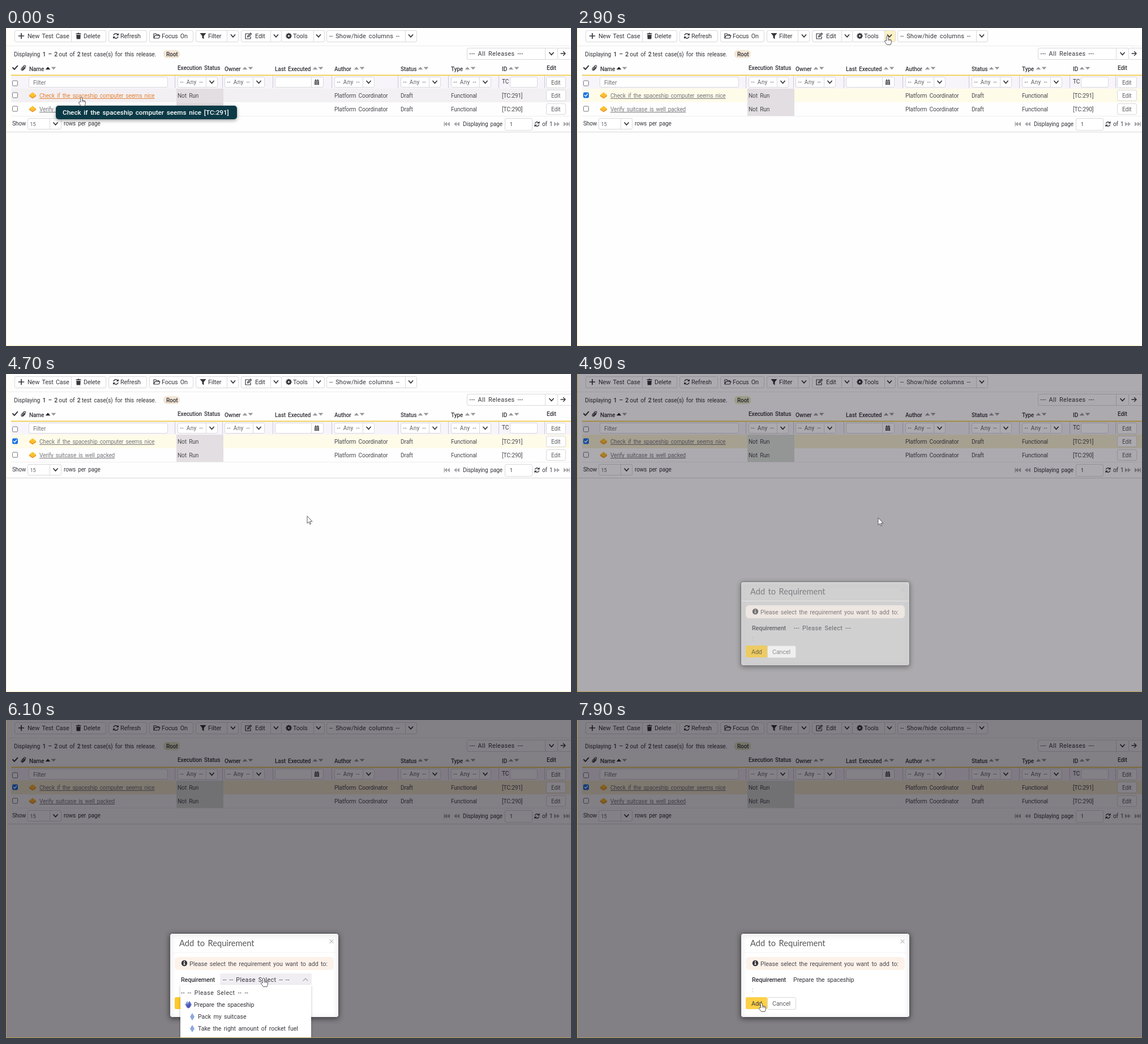
Recreate the animation shown at these times as an HTML page with a canvas. Size 998x561 px, loop 8 s.

```html
<!DOCTYPE html>
<html lang="en">
<head>
<meta charset="utf-8">
<title>Add test case to requirement</title>
<style>
html, body { margin: 0; width: 100%; height: 100%; overflow: hidden; background: #fff; }
canvas { display: block; width: 998px; height: 561px; }
</style>
</head>
<body>
<canvas id="stage" width="998" height="561"></canvas>
<script>
const ctx = document.getElementById('stage').getContext('2d');
const LOOP = 8000, INK = '#36363c', GREY = '#606066', LINE = '#d9d9dc';
const clamp = v => Math.max(0, Math.min(1, v));

// Pointer stops: time, x, y
const stops = [
  [0, 133, 122], [700, 14, 118], [1100, 14, 118], [1200, 13, 118], [1600, 13, 118],
  [2300, 400, 50], [2800, 548, 14], [3200, 548, 14], [4100, 532, 251], [4700, 532, 251],
  [5000, 532, 255], [5900, 455, 455], [6200, 455, 455], [6900, 414, 496],
  [7200, 414, 496], [7800, 326, 499], [8000, 326, 499]
];

function pointerAt(t) {
  const i = stops.findIndex(s => s[0] > t);
  const [t0, x0, y0] = stops[i - 1], [t1, x1, y1] = stops[i];
  const u = (t - t0) / (t1 - t0), e = u * u * (3 - 2 * u);
  return { x: x0 + (x1 - x0) * e, y: y0 + (y1 - y0) * e };
}

function text(str, x, y, { size = 10, color = INK, weight = 400, font = 'Roboto', spacing = -0.15 } = {}) {
  ctx.font = `${weight} ${size}px ${font}, sans-serif`;
  ctx.letterSpacing = spacing + 'px';
  ctx.wordSpacing = '1.8px';
  ctx.fillStyle = color;
  ctx.fillText(str, x, y);
  return x + ctx.measureText(str).width;
}

function rect(x, y, w, h, color) {
  ctx.fillStyle = color;
  ctx.fillRect(x, y, w, h);
}

function box(x0, y0, x1, y1, { fill = '#fff', line = LINE, radius = 2.5 } = {}) {
  const inset = line ? .5 : 0;
  ctx.beginPath();
  ctx.roundRect(x0 + inset, y0 + inset, x1 - x0 - 2 * inset, y1 - y0 - 2 * inset, radius);
  ctx.fillStyle = fill;
  ctx.fill();
  if (line) { ctx.strokeStyle = line; ctx.lineWidth = 1; ctx.stroke(); }
}

function shape(path, x, y, { fill, line, width = 1.5 } = {}) {
  ctx.save();
  ctx.translate(x, y);
  const p = new Path2D(path);
  if (fill) { ctx.fillStyle = fill; ctx.fill(p, 'evenodd'); }
  if (line) {
    ctx.strokeStyle = line;
    ctx.lineWidth = width;
    ctx.lineCap = ctx.lineJoin = 'round';
    ctx.stroke(p);
  }
  ctx.restore();
}

function shadowed(blur, color, draw) {
  ctx.save();
  ctx.shadowBlur = blur;
  ctx.shadowColor = color;
  ctx.shadowOffsetY = 2;
  draw();
  ctx.restore();
}

const chevron = (x, y) => shape('M-3.5-2L0 2L3.5-2', x, y, { line: INK, width: 1.8 });
const divider = (x, y0, y1) => rect(x, y0, 1, y1 - y0, LINE);

function select(x, y0, y1, w, split, label, opts) {
  box(x, y0, x + w, y1);
  divider(x + split, y0, y1);
  text(label, x + 4.5, (y0 + y1) / 2 + 3.5, opts);
  chevron(x + (split + w) / 2, (y0 + y1) / 2);
}

function checkbox(y, checked) {
  box(11, y - 5, 21, y + 5, { fill: checked ? '#1a73e8' : '#fff', line: checked ? '#1a73e8' : '#77777c', radius: 1.5 });
  if (checked) shape('M-2.6 0L-.7 2L2.8-2.2', 16, y, { line: '#fff', width: 1.4 });
}

function refreshIcon(x, y, r) {
  ctx.strokeStyle = INK;
  ctx.lineWidth = 1.4;
  for (const a of [Math.PI * 1.08, Math.PI * .08]) {
    ctx.beginPath();
    ctx.arc(x, y, r, a, a + 2.3);
    ctx.stroke();
  }
  shape(`M${r + .8}-5V-1H${r - 3.6}ZM${-r - .8} 5V1H${3.6 - r}Z`, x, y, { fill: INK });
}

function gear(x, y) {
  ctx.strokeStyle = INK;
  ctx.lineWidth = 2.4;
  for (let i = 0; i < 4; i++) {
    const a = i * Math.PI / 4, dx = Math.cos(a) * 5.2, dy = Math.sin(a) * 5.2;
    ctx.beginPath();
    ctx.moveTo(x - dx, y - dy);
    ctx.lineTo(x + dx, y + dy);
    ctx.stroke();
  }
  ctx.beginPath();
  ctx.arc(x, y, 3.9, 0, 7);
  ctx.fillStyle = INK;
  ctx.fill();
  ctx.beginPath();
  ctx.arc(x, y, 1.6, 0, 7);
  ctx.fillStyle = '#fff';
  ctx.fill();
}

function toolbar(t) {
  const label = (s, x) => text(s, x, 18, { size: 10.8 });
  [[15, 177], [181, 249], [253, 331], [335, 411], [415, 487], [486, 563], [566, 726]]
    .forEach(([a, b]) => box(a, 4, b, 25));
  if (t >= 2800 && t < 3300) rect(543, 5, 19, 19, '#fdf2c4');
  [115, 390, 467, 543, 705].forEach(x => divider(x, 4, 25));
  [401, 477, 552, 715].forEach(x => chevron(x, 14));

  shape('M-4.5 0H4.5M0-4.5V4.5', 27, 14, { line: INK, width: 1.7 });
  shape('M-4.5-4.5H-2L-1-5.5H1L2-4.5H4.5V-3H-4.5ZM-3.8-2H3.8L3.3 5.5H-3.3Z', 128, 14, { fill: INK });
  refreshIcon(194, 14, 4.2);
  shape('M-5 4V-4H-1.5L0-2.5H4V-1M-5 4L-2.7-.7H6L4 4Z', 266, 14, { line: INK, width: 1.2 });
  shape('M-5.5-5H5.5L1.5 0V5.5L-1.5 3.5V0Z', 348, 14, { fill: INK });
  shape('M1-4H-5V5H4V1M-1.5 2L-1 0L4-5L5.5-3.5L.5 1.5Z', 428, 14, { line: INK, width: 1.2 });
  gear(499.5, 14);

  label('New Test Case', 38);
  label('Delete', 137);
  label('Refresh', 202);
  label('Focus On', 275);
  label('Filter', 357);
  label('Edit', 440);
  label('Tools', 507);
  text('-- Show/hide columns --', 571, 18, { size: 10.9, spacing: .22 });
  rect(1, 31, 997, 1, '#ececee');
}

function summary(dim) {
  const big = { size: 10.4 }, bold = { size: 10.4, weight: 500 };
  let x = text('Displaying ', 14, 49.5, big);
  x = text('1 – 2', x, 49.5, bold);
  x = text(' out of ', x, 49.5, big);
  x = text('2', x, 49.5, bold);
  text(' test case(s) for this release.', x, 49.5, big);
  box(278, 39, 307, 53, { fill: dim ? '#e6e9c6' : '#f2e6d5', line: null, radius: 6 });
  text('Root', 283, 49.5, { weight: 500 });
  select(814, 35, 56, 161, 138, '--- All Releases ---', { size: 10.8, spacing: .4 });
  box(974, 35, 1001, 56);
  shape('M-4 0H4M.5-3.5L4 0L.5 3.5', 984, 45, { line: INK, width: 1.4 });
}

function header() {
  const head = (s, x, y = 75.5) => text(s, x, y, { size: 10.1, weight: 500 });
  shape('M-4 0L-1.2 3L4.3-3.2', 16, 70, { line: INK, width: 2 });
  shape('M1.5-1.5L-2 2Q-3.2 4-1.3 3.5L3.5-1.3Q4.5-4.5 1.5-4L-3.5 1Q-5.5 5-1.5 4.8L2.8.8', 31, 70, { line: INK, width: 1.1 });
  head('Name', 41);
  head('Execution Status', 303, 74);
  head('Owner', 386);
  head('Last Executed', 475);
  head('Author', 580);
  head('Status', 697);
  head('Type', 786);
  head('ID', 876);
  head('Edit', 955, 74);
  [74, 422, 546, 619, 732, 815, 892].forEach((x, i) => {
    shape('M-4.3 2.3L0-2.5L4.3 2.3Z', x, 71, { fill: i ? '#98989d' : '#202024' });
    shape('M-4.3-2.3L0 2.5L4.3-2.3Z', x + 10, 71, { fill: '#98989d' });
  });
}

function filters() {
  rect(9, 84, 989, 23, '#f7f4fa');
  rect(9, 82.5, 989, 1.7, '#f0cb46');
  [298, 382, 471, 575, 692, 781, 870, 951].forEach(x => rect(x, 84, 1, 22, '#cfc9d8'));
  checkbox(97.5, false);
  box(40, 86, 286, 105);
  text('Filter', 48, 99.5, { size: 10.4, color: '#77777c' });
  [303, 386, 580, 697, 786].forEach(x => select(x, 86, 105, 71, 50, '-- Any --', { color: GREY, spacing: .45 }));
  box(475, 86, 561, 105);
  divider(539, 86, 105);
  shape('M-4-3H-2.5V-5H-1V-3H1V-5H2.5V-3H4V-1.8H-4ZM-4-1H4V4.5H-4Z', 549, 95.5, { fill: INK });
  shape('M-4 1.7H4M-1.3-1V4.5M1.3-1V4.5', 549, 95.5, { line: '#fff', width: .6 });
  text('TC', 876, 97.5);
  box(890, 86, 939, 105);
  editButton(86);
}

function editButton(y) {
  box(954, y, 989, y + 20);
  text('Edit', 963, y + 13.5, { color: GREY });
}

function row(y, title, id, { fill, checked, hot, dim }) {
  const base = y + 16, color = hot ? '#e28337' : '#77777c';
  const cell = (s, x) => text(s, x, base, { size: 10.2, color: '#4a4a50' });
  rect(9, y, 989, 24, fill);
  rect(301, y, 83, 24, dim ? '#dbe1da' : '#e2dee1');
  rect(9, y + 24, 989, 1, '#efeff1');
  checkbox(y + 11.5, checked);
  shape('M-6-1L0-5.5L6-1L0 3Z', 47, y + 12, { fill: '#fdc22c' });
  shape('M-6-1L0 3L6-1V1.5L0 5.5L-6 1.5Z', 47, y + 12, { fill: '#ef9a20' });
  const end = text(title, 59, base, { color });
  rect(59, base + 1, end - 59, 1, color);
  cell('Not Run', 303);
  cell('Platform Coordinator', 580);
  cell('Draft', 697);
  cell('Functional', 786);
  cell(id, 876);
  editButton(y + 2);
}

function pager() {
  text('Show', 11, 172);
  select(38, 159, 179, 60, 39, '15', { size: 9, color: GREY });
  text('rows per page', 102, 172);
  const arrows = (x, dir, bar) => {
    shape(`M0-4L${5 * dir} 0L0 4ZM${-5 * dir}-4L0 0L${-5 * dir} 4Z`, x, 169.5, { fill: '#a7a7ac' });
    if (bar) rect(x + 5 * dir - .5, 165.5, 1.3, 8, '#a7a7ac');
  };
  arrows(779, -1, true);
  arrows(796, -1);
  arrows(973, 1);
  arrows(990, 1, true);
  text('Displaying page', 807, 173);
  box(881, 159, 930, 181);
  text('1', 890, 173, { size: 9 });
  refreshIcon(938, 169.5, 3.8);
  text('of 1', 947, 173);
  rect(1, 183, 997, 1, '#d8d8da');
}

function tooltip(alpha) {
  ctx.save();
  ctx.globalAlpha = alpha;
  shadowed(6, 'rgba(0,0,0,.4)', () => box(88, 137, 408, 161, { fill: '#0b3a46', line: null, radius: 5 }));
  text('Check if the spaceship computer seems nice [TC:291]', 100, 153, { size: 11.7, color: '#fff', weight: 500, spacing: 0 });
  ctx.restore();
}

function toolsMenu(y) {
  const items = ['Execute Tests', 'Export Items', 'Print Items', 'Copy Items', 'Move Items', 'Block Selected',
    'Unblock Selected', 'Add to Release', 'Add to Test Set', 'Add to Requirement', 'Remove Items'];
  shadowed(5, 'rgba(0,0,0,.25)', () => box(486, 26, 656, 310));
  items.forEach((item, i) => {
    const top = 31 + i * 25, hot = y >= top && y < top + 25;
    if (hot) rect(487, top, 168, 25, '#fdf2c4');
    shape('M-3.5-3.5H3.5V3.5H-3.5Z', 501, top + 12.5, { line: GREY, width: 1.2 });
    text(item, 513, top + 16.5, { size: 10.8 });
  });
}

const diamond = (x, y, color) => shape('M0-6.5L4 0L0 6.5L-4 0Z', x, y, { fill: color });

function requirementList(hot) {
  const item = (s, y) => text(s, 339, y, { size: 10.5, spacing: 0 });
  shadowed(4, 'rgba(0,0,0,.25)', () => rect(308, 467, 231, 100, '#fff'));
  text('-- -- Please Select -- --', 309, 485, { size: 10.5, spacing: .55 });
  if (hot) rect(309, 491, 230, 21, '#f6f3fa');
  diamond(320, 502, '#93a9e2');
  diamond(324, 502, '#5f7fd0');
  shape('M-4-2L0 1L3-4L4 3L0 7L-3 3Z', 322, 502, { fill: '#5454b5' });
  text('Prepare the spaceship', 332, 505.5, { weight: hot ? 500 : 400, color: hot ? '#e17a3b' : INK, size: 10.7 });
  diamond(329, 523.5, '#8ca9df');
  item('Pack my suitcase', 527);
  diamond(329, 544.5, '#8ca9df');
  item('Take the right amount of rocket fuel', 548);
  diamond(322, 566, '#e6bd55');
}

function modal(t, pointer) {
  const open = t >= 6100 && t < 7200, chosen = t >= 7200;
  const onAdd = t > 7200 && pointer.x < 337;
  shadowed(9, 'rgba(0,0,0,.5)', () => box(289, 376, 588, 525, { line: '#55535a', radius: 4 }));
  text('Add to Requirement', 306, 399, { size: 14.6, font: 'Lato', color: '#55555a', spacing: 0 });
  shape('M-3-3L3 3M3-3L-3 3', 575, 390.5, { line: '#c4c4c8', width: 1.4 });
  rect(291, 410, 295, 1, '#f3f3f4');
  box(298, 418, 579, 441, { fill: '#fdf2ea', line: null, radius: 6 });
  ctx.beginPath();
  ctx.arc(315, 429, 5.2, 0, 7);
  ctx.fillStyle = INK;
  ctx.fill();
  shape('M-1-3.5H1V-2H-1ZM-1.5-1H.8V2H1.6V3H-1.6V2H-.8V0H-1.5Z', 315, 429, { fill: '#fff' });
  text('Please select the requirement you want to add to:', 324, 433.5, { size: 10.7, color: '#4a4a50', spacing: -.09 });
  text('Requirement', 309, 462, { size: 10.8, weight: 500 });
  text(':', 309, 480, { color: '#88888c' });
  if (open || (t >= 5800 && !chosen)) {
    box(378, 447, 540, 467, { fill: '#f0eef3', line: null });
    shape('M-4 2L0-2L4 2', 529, 458, { line: '#a9a9ae', width: 1.3 });
  }
  if (chosen) text('Prepare the spaceship', 382, 461.5, { size: 10.8 });
  else text(open ? '-- -- Please Select -- --' : '--- Please Select ---', 383, 461.5, { size: 10.7, spacing: .42 });
  box(336, 489, 387, 511);
  box(298, 489, 336, 510, { fill: onAdd ? '#fdd046' : '#fcc92d', line: null });
  text('Add', 308, 504, { size: 10.8 });
  text('Cancel', 345, 504, { size: 10.8, color: GREY });
  if (open) requirementList(pointer.y >= 491);
}

function drawPointer({ x, y }, hand) {
  const style = { fill: '#fff', line: '#4a4a50', width: .9 };
  if (hand) {
    shape('M-1.5 8.5V1Q0-1 1.5 1V5.5L6 6.5Q7.6 7 7.5 9L7 12.5L6 15.5H-.5L-4.5 10Q-4.6 8-3 8.2Z', x, y, style);
    shape('M1.5 5.5V8.5M3.5 6V8.5M5.4 6.5V8.8', x, y, { line: '#4a4a50', width: .7 });
  } else {
    shape('M0 0V12.5L2.9 9.8L4.9 14.2L6.6 13.4L4.7 9.2H8.6Z', x, y, style);
  }
}

function draw(t) {
  const pointer = pointerAt(t);
  const fade = clamp((t - 4700) / 300), dim = fade > 0;
  const checked = t >= 1500;
  rect(0, 0, 998, 561, '#fefefe');
  toolbar(t);
  summary(dim);
  header();
  filters();
  row(107, 'Check if the spaceship computer seems nice', '[TC:291]', {
    fill: dim ? '#f6efd2' : checked ? '#fefbe9' : '#f3f0f3',
    checked, dim, hot: t < 700 && pointer.x > 59
  });
  row(131, 'Verify suitcase is well packed', '[TC:290]', { fill: '#fefefe', checked: false, dim });
  pager();
  if (t < 300) tooltip(1 - t / 300);
  if (t >= 3000 && t < 4500) toolsMenu(pointer.y);
  if (dim) {
    rect(0, 0, 998, 561, `rgba(8,2,14,${.5 * fade})`);
    ctx.save();
    ctx.globalAlpha = fade;
    ctx.translate(0, -30 * (1 - fade));
    modal(t, pointer);
    ctx.restore();
  }
  const edge = dim ? '#b89a4c' : '#fdebbd';
  rect(0, 0, 1, 561, edge);
  rect(0, 560, 998, 1, edge);
  const hand = t < 1700 || (t >= 2700 && t < 4500) || t >= 5800;
  drawPointer(pointer, hand);
}

function tick(now) {
  draw(Math.floor((now % LOOP) / 100) * 100);
  requestAnimationFrame(tick);
}
requestAnimationFrame(tick);
</script>
</body>
</html>
```
